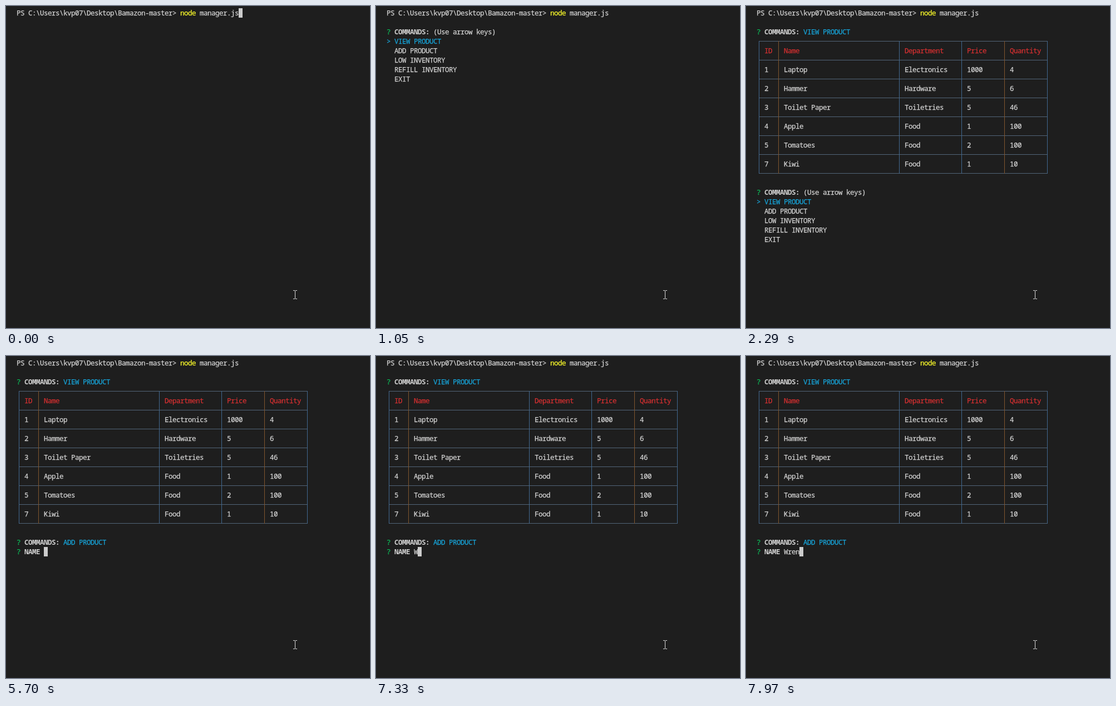
An HTML page for the animation above (8000 ms loop, 654 by 580 pixels).

```html
<!DOCTYPE html>
<html lang="en">
<head>
<meta charset="utf-8">
<title>Terminal inventory manager</title>
<style>
  html, body { margin: 0; width: 100%; height: 100%; overflow: hidden; background: #1e1e1e; }

  /* Character grid: 7 x 17 px cells, first cell at (19, 4) */
  .term {
    position: absolute; left: 19px; top: 4px;
    color: #d4d4d4;
    font: 12.5px/17px "Noto Sans Mono", "DejaVu Sans Mono", monospace;
    letter-spacing: calc(7px - 0.6em);
    font-variant-ligatures: none;
    -webkit-text-stroke: 0.25px;
  }
  pre { position: absolute; left: 0; margin: 0; font: inherit; white-space: pre; }
  b { color: #d0d0d0; -webkit-text-stroke: 0; }
  i { font-style: normal; color: #0dbc59; }
  u { text-decoration: none; color: #17a5da; }
  .cmd { color: #ffff2a; }
  .head { color: #d63031; }
  .row2 { top: 34px; }
  .row4 { top: 68px; }
  .row19 { top: 323px; }

  .grid { position: absolute; left: 4px; top: 59px; width: 519px; height: 239px;
    background: repeating-linear-gradient(#526579 0 1px, transparent 1px 34px); }
  .grid svg { display: block; }

  .cursor { position: absolute; left: 0; top: 0; width: 7px; height: 17px; background: #ccc; }
  .typed { position: absolute; left: 49px; top: 340px; height: 17px; overflow: hidden; white-space: pre; }
  .mouse { position: absolute; left: 514px; top: 511px; }

  .first, .result, .second, .third, .name, .typed, .cursor { animation: 8s step-end infinite; }
  .first { animation-name: first; }
  .result { animation-name: result; }
  .second { animation-name: second; }
  .third { animation-name: third; }
  .name { animation-name: name; }
  .typed { animation-name: type; }
  .cursor { animation-name: cursor; }

  @keyframes first { 0%, 28.625%, to { opacity: 0 } 13.125% { opacity: 1 } }
  @keyframes result { 0% { opacity: 0 } 28.625%, to { opacity: 1 } }
  @keyframes second { 0%, 42.25%, to { opacity: 0 } 28.625% { opacity: 1 } }
  @keyframes third { 0%, 71.25%, to { opacity: 0 } 42.25% { opacity: 1 } }
  @keyframes name { 0% { opacity: 0 } 71.25%, to { opacity: 1 } }
  @keyframes type {
    0% { width: 0 }
    91.625% { width: 7px }
    95.625% { width: 14px }
    96.625% { width: 21px }
    99.625%, to { width: 28px }
  }
  @keyframes cursor {
    0% { transform: translate(399px, 0); opacity: 1 }
    4.5% { transform: translate(0, 17px); opacity: 1 }
    12.125% { transform: translate(0, 34px); opacity: 1 }
    13.125% { transform: translate(0, 34px); opacity: 0 }
    71.25% { transform: translate(49px, 340px); opacity: 1 }
    91.625% { transform: translate(56px, 340px); opacity: 1 }
    95.625% { transform: translate(63px, 340px); opacity: 1 }
    96.625% { transform: translate(70px, 340px); opacity: 1 }
    99.625%, to { transform: translate(77px, 340px); opacity: 1 }
  }
</style>
</head>
<body>
<div class="term">
<pre>PS C:\Users\kvp07\Desktop\Bamazon-master&gt; <span class="cmd">node</span> manager.js</pre>

<pre class="first row2"><i>?</i> <b>COMMANDS:</b> (Use arrow keys)
<u>&gt; VIEW PRODUCT</u>
  ADD PRODUCT
  LOW INVENTORY
  REFILL INVENTORY
  EXIT</pre>

<div class="result">
<pre class="row2"><i>?</i> <b>COMMANDS:</b> <u>VIEW PRODUCT</u></pre>
<div class="grid">
  <svg width="519" height="239" fill="none">
    <path stroke="#41688f" d="M.5 0V239M252.5 0V239M364.5 0V239M518.5 0V239"/>
    <path stroke="#80552e" d="M35.5 0V239M441.5 0V239"/>
  </svg>
</div>
<pre class="row4">  <span class="head">ID   Name                           Department      Price      Quantity</span>

  1    Laptop                         Electronics     1000       4

  2    Hammer                         Hardware        5          6

  3    Toilet Paper                   Toiletries      5          46

  4    Apple                          Food            1          100

  5    Tomatoes                       Food            2          100

  7    Kiwi                           Food            1          10</pre>
</div>

<pre class="second row19"><i>?</i> <b>COMMANDS:</b> (Use arrow keys)
<u>&gt; VIEW PRODUCT</u>
  ADD PRODUCT
  LOW INVENTORY
  REFILL INVENTORY
  EXIT</pre>

<pre class="third row19"><i>?</i> <b>COMMANDS:</b>
  VIEW PRODUCT
<u>&gt; ADD PRODUCT</u>
  LOW INVENTORY
  REFILL INVENTORY
  EXIT</pre>

<pre class="name row19"><i>?</i> <b>COMMANDS:</b> <u>ADD PRODUCT</u>
<i>?</i> <b>NAME</b></pre>

<div class="typed">Wren</div>
<div class="cursor"></div>
</div>

<svg class="mouse" width="11" height="18" fill="none" stroke="#ddd">
  <path d="M2 1.5H5M6 1.5H9M5.5 2V16M2 16.5H5M6 16.5H9"/>
</svg>
</body>
</html>
```
